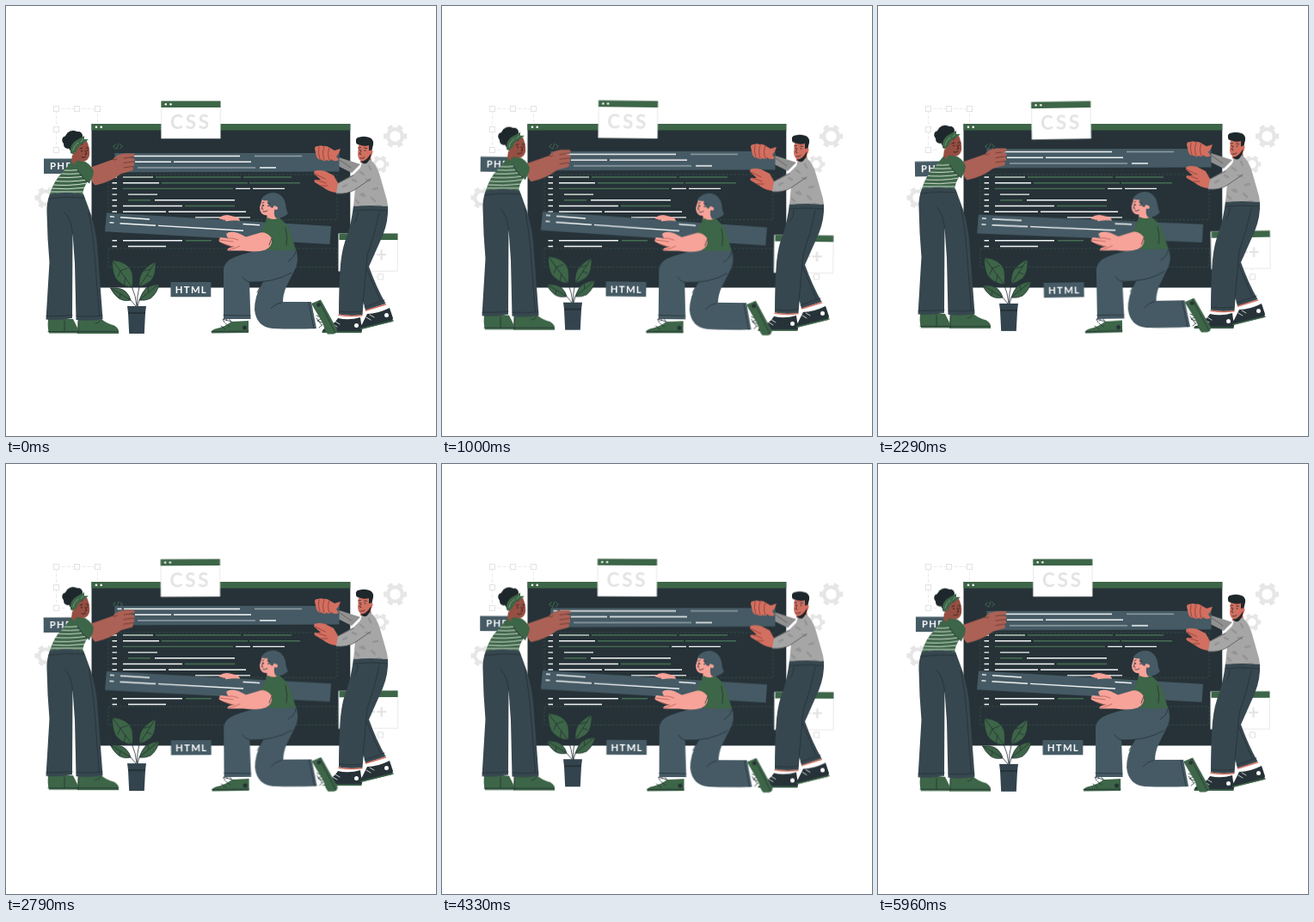
These frames come from a looping animation (500x500 px, 6000 ms). An HTML page without scripts:

```html
<!DOCTYPE html>
<html lang="en">
<head>
<meta charset="utf-8">
<title>Building a page</title>
<style>
html, body { margin: 0; width: 100%; height: 100%; overflow: hidden; background: #fff; }
svg { display: block; width: 100vw; height: 100vh; }
text { font-family: Lato, "Open Sans", sans-serif; font-weight: 700; }
.tag { font-size: 11.3px; letter-spacing: 1.3px; fill: #fff; }
.pale { font-size: 22.5px; fill: #e3e3e3; }
.leaf { fill: #3d6547; }
.ln { fill: none; stroke-linecap: round; stroke-linejoin: round; }
.code { fill: none; stroke-width: 1.4; }
.white { stroke: #f4f6f6; }
.green { stroke: #456f52; }
.grey { stroke: #91a0a5; }
.ink { stroke: #263238; stroke-width: .8; }
.sway, .lift { transform-origin: 250px 250px; }
.sway { animation: sway 3s linear infinite; }
.lift { animation: lift 6s linear infinite; }
.mid { animation-duration: 3s; }
.quick { animation-duration: 1.5s; }
@keyframes sway { 25% { transform: rotate(1deg); } 75% { transform: rotate(-1deg); } }
@keyframes lift { 50% { transform: translateY(-6.5px); } }
</style>
</head>
<body>
<svg viewBox="0 0 500 500">
<defs>
  <g id="gear" fill="none" stroke="#e6e6e6">
    <circle r="8.4" stroke-width="4.4"/>
    <circle r="11.8" stroke-width="3.6" pathLength="12" stroke-dasharray="1 1" stroke-dashoffset=".5"/>
  </g>
  <rect id="knob" x="-3" y="-3" width="6" height="6" fill="#fff" stroke="#e3e3e3"/>
  <path id="torso" d="M76 181L84 179 98 187 95 204 Q90 211 89 219Q70 215 51 219Q55 204 66 193Z"/>
  <path id="tee" d="M414 181L424 179Q431 184 435 198L443 226 444 233Q424 231 404 233L406 212Z"/>
  <path id="near" d="M426 184Q434 192 424 201L405 214Q396 219 384 218Q381 211 386 206L404 196 416 184Z"/>
  <clipPath id="inTorso"><use href="#torso"/></clipPath>
  <clipPath id="inTee"><use href="#tee"/><use href="#near"/></clipPath>
</defs>

<!-- backdrop -->
<use href="#gear" x="452.5" y="151.5"/>
<use href="#gear" transform="translate(435 184) scale(.76)"/>
<use href="#gear" transform="translate(46 223) scale(.92)"/>
<g fill="none" stroke="#e6e6e6" stroke-width=".8" stroke-dasharray="4 2">
  <path d="M58.5 167.5V119.5H106.5V140M58.5 167.5H70M412 315H435V292"/>
</g>
<use href="#knob" x="58.5" y="119.5"/><use href="#knob" x="82.5" y="119.5"/><use href="#knob" x="106.5" y="119.5"/>
<use href="#knob" x="58.5" y="143.5"/><use href="#knob" x="58.5" y="167.5"/><use href="#knob" x="435.5" y="315"/>

<!-- screen -->
<path fill="#263238" d="M99.500 137H400.300V327.500H99.500Z"/>
<path class="leaf" d="M99.500 137H400.300V144.500H99.500Z"/>
<circle cx="105" cy="140.8" r="1.3" fill="#fff"/><circle cx="110.7" cy="140.8" r="1.3" fill="#fff"/>
<path class="ln green" stroke-width=".9" d="M127.500 161L124.500 163.300 127.500 165.600M131 160L128.600 166.500M132.500 161L135.500 163.300 132.500 165.600"/>
<g fill="none" stroke="#3c5a4b" stroke-width=".6" stroke-dasharray="2.500 2">
  <path d="M119 196H385V248.500H119ZM119 282H385V303.500H119Z"/>
</g>
<g class="code">
  <path class="white" d="M123.500 199h5.500m-5.500 6.700h5.500m-5.500 6.700h5.500m-5.500 6.700h5.500m-5.500 6.700h5.500m-5.500 6.700h5.500m-5.500 6.700h5.500m-5.500 33.600h5.500m-5.500 6.700h5.500"/>
  <path class="white" d="M136 205.700H178M267 212.400H284M287 212.400H324M142 219.100H176M173 225.800H266M136 232.500H205M136 239.200H186M189 239.200H279M220 245.900H284M136 272.800H205M142 279.500H186"/>
  <path class="green" d="M174 199H273M276 199H332M181 205.700H281M283 205.700H342M136 212.400H264M142 225.800H168M208 232.500H266M209 272.800H239"/>
  <path stroke="#b9cbbd" d="M136 199H171"/>
</g>

<!-- windows and tags -->
<g class="sway">
  <path fill="#fff" stroke="#e0e0e0" stroke-width=".7" d="M180.700 110.700H249.200V153.900H180.700Z"/>
  <path class="leaf" d="M180.400 110.400H249.500V118H180.400Z"/>
  <circle cx="185.800" cy="114.200" r="1.200" fill="#fff"/><circle cx="191.500" cy="114.200" r="1.200" fill="#fff"/>
  <text class="pale" x="191" y="142.800" letter-spacing="2.800">CSS</text>
  <path fill="#fff" stroke="#e0e0e0" stroke-width=".7" d="M386.800 264.800H455.300V308.300H386.800Z"/>
  <path class="leaf" d="M387.500 264.500H455.500V272H387.500Z"/>
  <text class="pale" x="402" y="296.500">C++</text>
  <path fill="#455a64" d="M44 177.500H84V195H44Z"/>
  <text class="tag" x="51" y="190">PHP</text>
  <path fill="#455a64" d="M191.500 321H238.300V338.300H191.500Z"/>
  <text class="tag" x="196.800" y="333.700">HTML</text>
</g>

<!-- plant -->
<g class="lift mid">
  <g class="ln ink">
    <g class="leaf">
      <path d="M123.500 295.500Q143 297 147 311 148 320 147 327Q134 326 127 316 123 307 123.500 295.500Z"/>
      <path d="M174 297Q175 313 168 320 161 325 155 326.500Q154 317 158 310 164 302 174 297Z"/>
      <path d="M178.500 323Q175 335 168 340 162 343 155 342Q158 333 163 328 170 324 178.500 323Z"/>
      <path d="M121.500 328Q133 327 139 332 144 337 145 342Q136 344 130 339 125 335 121.500 328Z"/>
    </g>
    <path d="M124 296L146.500 327Q151 337 152 349M133 308l-3 7m9 1l-2 9m-4-17l8-3M174 297L155 326.500Q152 338 152.500 349M168 306l-7 2m3 5l5 2M178 323L155 342 153 349M166 333l-1-6M122 328L145 342 151 349M133 335l-1 5"/>
  </g>
  <path fill="#33444e" d="M141 349H163L162 357 160.800 381H143.200L142 357Z"/>
  <path fill="#263238" d="M142 356H162L161.800 358H142.200Z"/>
</g>

<!-- man and upper plank -->
<g class="lift">
  <path fill="#919191" d="M412 184L402 194 386 186 387 176Z"/>
  <path class="ln" stroke="#555" stroke-width=".7" d="M388 179L401 188"/>
  <path fill="#455a64" d="M126.500 171H387.500V192.500L125 193.500Z"/>
  <g class="code">
    <path class="white" d="M129.500 174.500h5M137 174.500H272M129 181.200h5M150 181.200H192M195 181.200H285M295 188H314"/>
    <path class="grey" d="M289 174.500H344M153 188H290"/>
  </g>
  <path fill="#fff" d="M387 358L414 358 414 368H386ZM417 351L441 345 443 354 420 361Z"/>
  <path fill="#263238" d="M386 363Q399 366 412 362L414 377 413 380H368Q367 376 372 374Q381 371 386 363Z"/>
  <path fill="#263238" d="M420 358Q432 358 446 351L450 363 449 367 412 376Q410 373 414 370Z"/>
  <path class="ln" stroke="#3d6547" stroke-width="1.600" d="M368 379L413 379M413 375.300L450 366"/>
  <circle cx="407.500" cy="371.500" r="2.500" fill="#fff"/><circle cx="442.500" cy="359.500" r="2.500" fill="#fff"/>
  <path class="ln white" stroke-width=".8" d="M380 370l5 3m-2-6l5 3M419 362l5 3m-1-6l5 3"/>
  <path fill="#37474f" d="M416 234L444 232Q445 250 438 267L422 303Q431 328 441.500 346L418 354 406 306Z"/>
  <path fill="#37474f" d="M404 232H438L432 262Q423 280 419 302L414.500 359Q400 361 387 358.500Q387 326 389 300Q391 280 397 266 402 250 404 232Z"/>
  <path class="ln" stroke="#d26f60" stroke-width="1.500" d="M387 359.300Q400 361.500 414 359.800M418.500 354L441.500 347"/>
  <path class="ln ink" d="M434 240Q429 266 420 290L415 346M388 355Q400 357 414 355M417 350L440 342M405 238Q424 236 443 238M409 240Q409 247 405 252M419 305L435 342"/>

  <!-- shirt -->
  <path fill="#b9594c" d="M413 174L424 174 425 182Q418 186 412 182Z"/>
  <use href="#tee" fill="#a6a6a6"/>
  <use href="#near" fill="#a6a6a6"/>
  <path clip-path="url(#inTee)" class="ln" stroke="#959595" stroke-width="2.600" d="M392 210l4-2m7-6l4 2m5-11l4 3m6-10l2 4m-5 12l4 1m4 10l5-1m-20 7l5 2m8 2l4 4m-22-1l3 3m5-11l2 3m12 12l5-1m-29 1l4 0"/>
  <path class="ln" stroke="#555" stroke-width=".8" d="M384 218Q397 219 405 214L424 201M386 206L404 197"/>

  <!-- hands -->
  <path fill="#d26f60" d="M359 166Q359 162.500 363 163Q366 161.500 369 163Q373 162 376 164.500L382 168 389 166Q388 171 384 175L387 179Q382 182 378 178Q377 181.500 373 179Q370 181.500 367 178.500Q363 179.500 361 175Z"/>
  <path class="ln" stroke="#8f3c34" stroke-width=".8" d="M364 164Q362 170 365 178M370 164Q367 171 370 179M376 165Q373 171 376 179"/>
  <path fill="#d26f60" d="M358.500 192Q363 190 371 192L381 197 386 206 384 217Q375 216 369 211L359 205Q357 202 361 202L366 202 358 195Z"/>
  <path class="ln" stroke="#8f3c34" stroke-width=".8" d="M359 195L371 201M361 202L372 206M366 209L374 209"/>

  <!-- head -->
  <path fill="#d26f60" d="M410 160L425 158 426 172Q423 180 416 181 410 181 409 173Z"/>
  <path fill="#1e272b" d="M407 158Q406 153 411 152.500 416 151 421 152.500 428 154 427 161L425 169 422 168 422 162Q416 164 410 161Q407 161 407 158Z"/>
  <path fill="#1e272b" d="M424.500 171Q424 179 419 183Q415 184 412.500 180.500Q419 181 424.500 171Z"/>
  <circle cx="424.500" cy="169.500" r="2.100" fill="#d26f60"/>
  <path class="ln ink" d="M409.500 165l3-.500m4 .500l3 .500M413 168l-2 4 2 .500M412 177q3 1 5-1"/>
  <circle cx="411.500" cy="167.500" r=".8" fill="#263238"/><circle cx="417.500" cy="168" r=".8" fill="#263238"/>
</g>

<!-- kneeling woman with lower plank -->
<g class="sway">
  <path fill="#f7a399" d="M248 246Q254 242 260 243.500L270 246 273 251 256 252Z"/>
  <path fill="#455a64" d="M117 240.500L378 256 376.500 277 115 262.300Z"/>
  <path class="code white" d="M121 244.800l5 .3M133 245.700L167 248M275.500 253.500L295 254.700M120.500 251.800l5 .3M132.500 252.700L174 255.300M177 255.400L276 261.300"/>
  <path class="ln" stroke="#f7a399" stroke-width="2.400" d="M249 246.500L259 245M256 249L268 247.500"/>

  <!-- shoes -->
  <path class="leaf" d="M262 367L282 366 282 380 239 380.500Q238 377 243 375.500Q255 373 262 367Z"/>
  <path class="ln ink" d="M239 378.500L282 378M250 372l5 4m0-7l5 4M262 367l-10-3 2 4m8-1l-4-5-2 4"/>
  <circle cx="277.500" cy="374" r="2.500" fill="#263238"/>
  <path fill="#fff" d="M355 352L362 350 373 373 362 375Z"/>
  <path class="ln ink" d="M361 360l7 3-6 3 8 3-6 5m-3-11l6 8"/>
  <path class="leaf" d="M355 346L366 341.500 385 376Q385 380 381 381.500L374 381.500Q370 377 369 370Z"/>
  <path class="ln ink" d="M364 343L383 380"/>
  <circle cx="363.500" cy="347.500" r="2.300" fill="#263238"/>

  <!-- trousers -->
  <path fill="#455a64" d="M306 283H337Q341 294 337 304L326 326Q322 336 322 344L355 344 361 375Q335 376 310 375 291 373 289 353 289 338 297 324L303 312Z"/>
  <path fill="#455a64" d="M304 283L337 283Q342 304 325 315Q308 321 283 321L284.500 364H253L253 310Q252 297 266 292 284 285 304 283Z"/>
  <path class="ln ink" d="M332 310Q312 322 283 321M292 333L299 320M283 321Q277 319 275 315M253 359.500L284 360M352 344.500L358 375M320 345Q313 346 308 352M337 285Q336 292 328 297"/>

  <!-- torso and head -->
  <path fill="#f7a399" d="M304 236H316L319 252 303 254Z"/>
  <path class="leaf" d="M304 246Q312 250 317 246 327 252 331 264L337 283.500Q321 285 304 283.500L307 271 296 264Z"/>
  <path fill="#f7a399" d="M296 263.500Q303 262 309 270Q310 280 302 283.500 292 287 276 284.500L258 284.500Q255 282 264 280L252 276Q247 274 247.500 272.500L249 269 258 270 256 265Q260 261 270 264L279 268.500Z"/>
  <path class="ln" stroke="#b95f55" stroke-width=".8" d="M248 272L264 274M257 270Q264 269 270 272M258 284Q267 282 272 279M265 280Q260 280 252 276"/>
  <path class="ln ink" d="M309 270L306 278M325 258Q328 269 326 278"/>
  <path fill="#f7a399" d="M298 224L295 234Q295 243 303 243.500 312 243 315 232L311 221Z"/>
  <path fill="#455a64" d="M297 225Q301 217 312 217 323 219 325 230 326 239 328 241Q324 246 315 247Q311 245 312 237 315 234 313 232 311 232 310 235Q305 234 304 226Q301 227 297 225Z"/>
  <path class="ln ink" d="M298 229l2-1m4 1l3 1M299 239q3 1 5-1M298.500 231l-1 5 1.500.300"/>
  <circle cx="299.500" cy="232" r=".8" fill="#263238"/><circle cx="305" cy="232.500" r=".8" fill="#263238"/>
  <circle cx="314" cy="235" r="2.100" fill="#f7a399"/>
</g>

<!-- standing woman -->
<g class="lift quick">
  <path class="leaf" d="M49 364H78L83 374 84 380.500H50Q48 374 49 364Z"/>
  <path class="leaf" d="M84 364L110 363Q116 369 126 371.500 132 375 131 381H83Z"/>
  <path class="ln ink" d="M49 378.500H130M68 366V378M84 366V380M110 365q-2 4-6 4"/>
  <path fill="#37474f" d="M51 218.500Q70 215 90 218.500Q95 232 99 243Q106 266 107 290L112.500 364Q98 367 81.500 365L80 300 77.500 264 77 363Q62 366 46.500 364.500L50.500 298Q48 270 47.500 240Q47 229 51 218.500Z"/>
  <path class="ln ink" d="M77.500 265Q76 247 68 240M47 360.500Q62 361 77 359.500M82 360.500Q97 362 112 360M50 224Q70 221 91 223M96 240Q101 262 103 290L108.500 360"/>
  <use href="#torso" class="leaf"/>
  <g clip-path="url(#inTorso)" class="ln" stroke="#d5e0d7" stroke-width="1">
    <path d="M60 190Q73 193 95 189M58 194Q73 197 95 193.500M55 198.500Q73 201 95 197.500M52 203Q73 205.500 95 202M50 207.500Q72 210 95 206M48 212Q72 214 95 211M48 216Q72 216 95 216"/>
  </g>
  <path fill="#964f43" d="M77 173L90 176 89 184Q82 187 76 181Z"/>
  <path fill="#ab6155" d="M97 188L124 178.500Q130 172 138 171.500L148 171.500Q151 173 149 175L143 176 149 177.500Q151 180 148 181L149 183Q150 186 147 186.500L148 189Q148 192 143 192.500L134 195Q121 205 104 208.500 98 205 97 188Z"/>
  <path class="ln" stroke="#6b342d" stroke-width=".8" d="M148 175.500L137 177M148 181L137 182.500M147 186.500L137 188M124 178.500Q127 180 129 178"/>
  <path class="leaf" d="M80 181Q91 177 99 187L102 192 101 198 97 206Q88 200 83 190Z"/>
  <path class="ln ink" d="M83 190Q88 200 97 206"/>

  <!-- head -->
  <path fill="#964f43" d="M80 161L94 157Q98 166 97 174 95 181 89 181 82 180 78 172Z"/>
  <g fill="#1e272b">
    <circle cx="78" cy="154" r="9.300"/><circle cx="70" cy="156" r="4.800"/><circle cx="84" cy="151" r="5"/>
    <circle cx="72" cy="161" r="5"/><circle cx="78" cy="165" r="4.600"/><circle cx="86" cy="157" r="4.500"/>
  </g>
  <path class="leaf" d="M75 171Q74 160 82 156L91 151 91 155 96 155 91 159Q82 162 81 174Z"/>
  <path class="ln" stroke="#8fb096" stroke-width=".7" d="M78 168q1-6 6-9M90 155l-3 3"/>
  <path class="ln" stroke="#2a1715" stroke-width=".8" d="M86 166l3-1m4 0l3 0M92 168l2 4-2 .500M88 176q3 1 5-1"/>
  <circle cx="88" cy="168.500" r=".8" fill="#2a1715"/><circle cx="94.500" cy="168" r=".7" fill="#2a1715"/>
  <circle cx="80.500" cy="172" r="2" fill="#964f43"/>
</g>
</svg>
</body>
</html>
```
